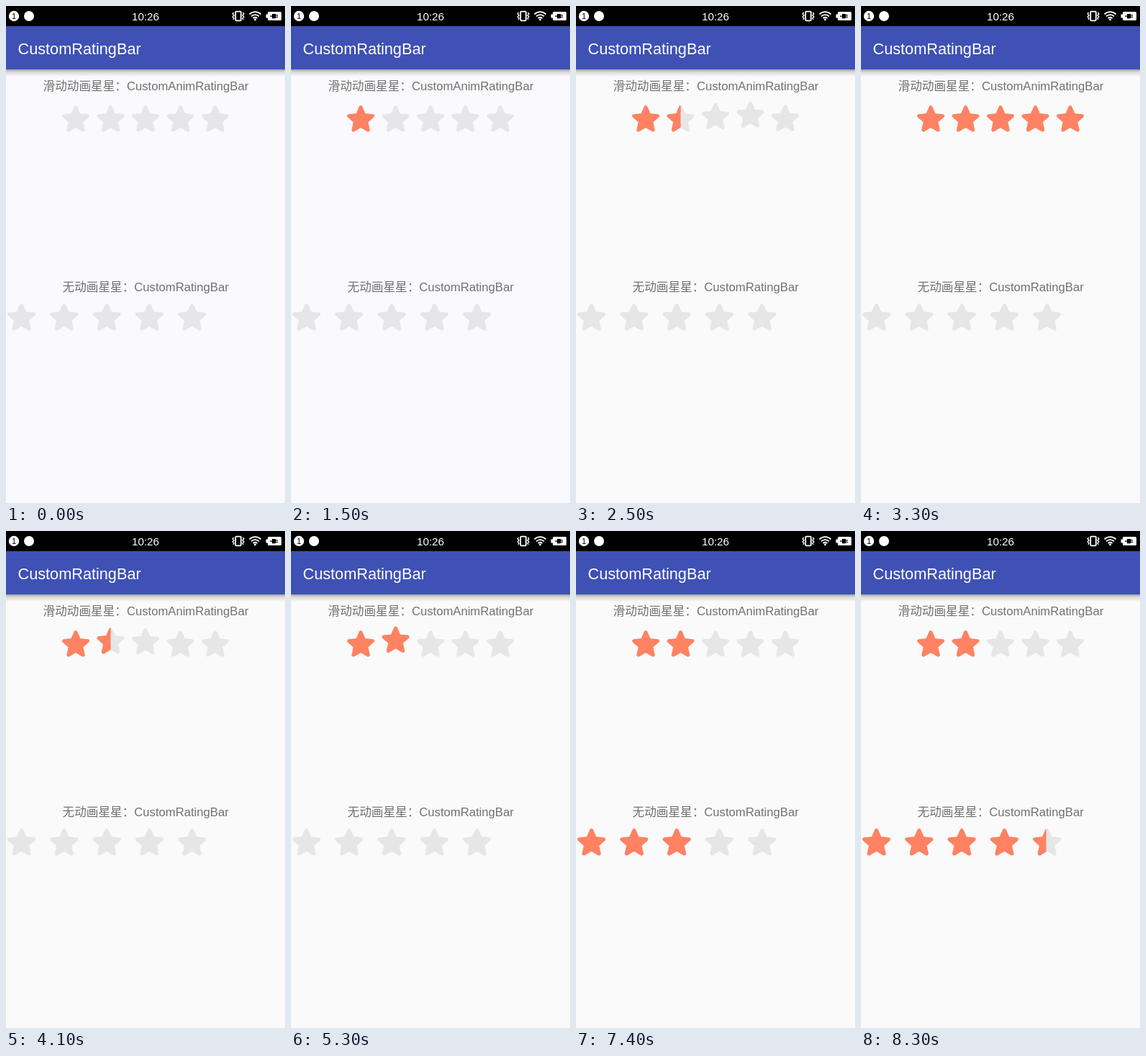
Recreate the animation shown at these times as an HTML page. Size 388 by 690 pixels, loop 8.4 s.

```html
<!DOCTYPE html>
<html lang="zh">
<head>
<meta charset="utf-8">
<title>CustomRatingBar</title>
<style>
html, body { margin: 0; width: 100%; height: 100%; overflow: hidden; background: #fafafa; }
svg { display: block; width: 388px; height: 690px; }
text { font-family: "Liberation Sans", Arial, "Noto Sans CJK SC", "Noto Sans CJK", sans-serif; }
.label { font-size: 16.65px; fill: #717171; }
.empty { fill: #e6e6e6; stroke: #e6e6e6; }
.full { fill: #ff8262; stroke: #ff8262; }
.star { stroke-width: 5; stroke-linejoin: round; }
</style>
</head>
<body>
<svg viewBox="0 0 388 690">
  <defs>
    <linearGradient id="shade" x2="0" y2="1">
      <stop offset="0" stop-color="#000" stop-opacity=".36"/>
      <stop offset=".35" stop-color="#000" stop-opacity=".14"/>
      <stop offset="1" stop-color="#000" stop-opacity="0"/>
    </linearGradient>
    <clipPath id="clipTop"><rect y="100" height="100" width="0"/></clipPath>
    <clipPath id="clipLow"><rect y="400" height="70" width="0"/></clipPath>
  </defs>

  <rect id="page" width="388" height="690" fill="#faf9fe"/>
  <rect y="88" width="388" height="10" fill="url(#shade)"/>
  <rect y="28" width="388" height="60" fill="#3f51b5"/>
  <rect width="388" height="28"/>

  <g fill="#fff">
    <circle cx="11" cy="14" r="7.2"/>
    <text x="11" y="18" font-size="11" text-anchor="middle" fill="#000">1</text>
    <circle cx="32" cy="14" r="7"/>
    <text x="175" y="20" font-size="15.2">10:26</text>
    <g fill="none" stroke="#fff" stroke-width="1.4">
      <rect x="319.2" y="7.7" width="7.6" height="12.6" rx="1" stroke-width="1.8"/>
      <path d="M316.5 9l-1.3 2 1.8 2-1.8 2 1.8 2-1 2M329.5 9l1.3 2-1.8 2 1.8 2-1.8 2 1 2"/>
      <path d="M338.5 11.5a11.2 11.2 0 0 1 16 0M341 14.3a7.8 7.8 0 0 1 11 0M343.5 17a4.2 4.2 0 0 1 6 0" stroke-width="1.8"/>
    </g>
    <circle cx="346.5" cy="18.8" r="1.5"/>
    <rect x="364" y="8" width="19" height="12" rx="1.5"/>
    <rect x="361.5" y="11.5" width="3" height="5"/>
    <path d="M367 13.5h3v-2.5h5v1.2h3v1.2h-3v1.4h3v1.2h-3v1.2h-5v-2.5h-3z" fill="#000"/>
    <text x="16.5" y="67" font-size="21.7">CustomRatingBar</text>
  </g>

  <text class="label" x="51.5" y="117">滑动动画星星：CustomAnimRatingBar</text>
  <text class="label" x="78.5" y="396">无动画星星：CustomRatingBar</text>

  <g id="topEmpty" class="star empty"/>
  <g clip-path="url(#clipTop)"><g id="topFull" class="star full"/></g>
  <g id="lowEmpty" class="star empty"/>
  <g clip-path="url(#clipLow)"><g id="lowFull" class="star full"/></g>
</svg>
<script>
const LOOP = 8400, STEP = 100, HOP = 300, LIFT = 5.6;
const top5 = { x: 97, y: 158, gap: 48.5, size: 1 };
const low5 = { x: 21.5, y: 433.5, gap: 59.3, size: 1.03 };
const $ = s => document.querySelector(s);

// [ms, rating] under the finger
const slide = [
  [0, 0], [1150, 0], [1200, .5], [1300, 1], [1600, 1], [2000, 5], [2150, 5],
  [2210, 4.5], [2350, 3.5], [2440, 2.5], [2500, 1.5], [2600, 1.5],
  [3000, 5], [3450, 5], [3860, 2.5], [4025, 1.5], [4060, 1.3], [4200, 1.3],
  [4500, 3.9], [4600, 3.9], [4800, 2.5], [5060, 1.2], [5150, 1.5], [5250, 1.9], [LOOP, 1.9]
];
// [ms, x of the fill edge]
const drag = [
  [0, 0], [5650, 0], [5700, 26], [5800, 26], [6600, 187], [6700, 211],
  [7150, 120], [7600, 205], [7900, 257.5], [LOOP, 257.5]
];

function at(keys, t) {
  const i = keys.findIndex(k => k[0] > t);
  const [t0, a] = keys[i - 1], [t1, b] = keys[i];
  return a + (b - a) * (t - t0) / (t1 - t0);
}

// moments at which the finger passes a level
function passes(level) {
  const out = [];
  for (let i = 1; i < slide.length; i++) {
    const [t0, a] = slide[i - 1], [t1, b] = slide[i];
    if ((a < level) !== (b < level)) out.push(t0 + (t1 - t0) * (level - a) / (b - a));
  }
  return out;
}

const points = Array.from({ length: 10 }, (_, i) => {
  const r = i % 2 ? 8 : 17.3, a = Math.PI * i / 5;
  return (r * Math.sin(a)).toFixed(2) + ',' + (-r * Math.cos(a)).toFixed(2);
}).join(' ');

function place(star, row, i, dy) {
  star.setAttribute('transform', `translate(${row.x + i * row.gap} ${row.y + dy}) scale(${row.size})`);
}

function addRow(id, row) {
  return Array.from({ length: 5 }, (_, i) => {
    const star = document.createElementNS('http://www.w3.org/2000/svg', 'polygon');
    star.setAttribute('points', points);
    place(star, row, i, 0);
    $(id).append(star);
    return star;
  });
}

const empties = addRow('#topEmpty', top5), fulls = addRow('#topFull', top5);
addRow('#lowEmpty', low5);
addRow('#lowFull', low5);
const hops = empties.map((_, i) => passes(i + .5));
const topEdge = $('#clipTop rect'), lowEdge = $('#clipLow rect');

function draw(now) {
  const t = Math.floor(now % LOOP / STEP) * STEP;
  const early = t < 1700;
  $('#page').setAttribute('fill', early ? '#faf9fe' : '#fafafa');
  $('svg').style.setProperty('--x', 0);
  for (const id of ['#topEmpty', '#lowEmpty']) {
    $(id).style.fill = $(id).style.stroke = early ? '#e6e5ea' : '#e6e6e6';
  }
  hops.forEach((times, i) => {
    const age = t - Math.max(-LOOP, ...times.filter(h => h <= t));
    const dy = age < HOP ? -LIFT * Math.sin(Math.PI * age / HOP) : 0;
    place(empties[i], top5, i, dy);
    place(fulls[i], top5, i, dy);
  });
  const shown = Math.ceil(at(slide, t) * 2 - 1e-6) / 2;
  topEdge.setAttribute('width', shown ? top5.x + top5.gap * (shown - .5) : 0);
  lowEdge.setAttribute('width', at(drag, t));
}

const start = performance.now();
function tick() {
  draw(performance.now() - start);
  requestAnimationFrame(tick);
}
tick();
</script>
</body>
</html>
```
